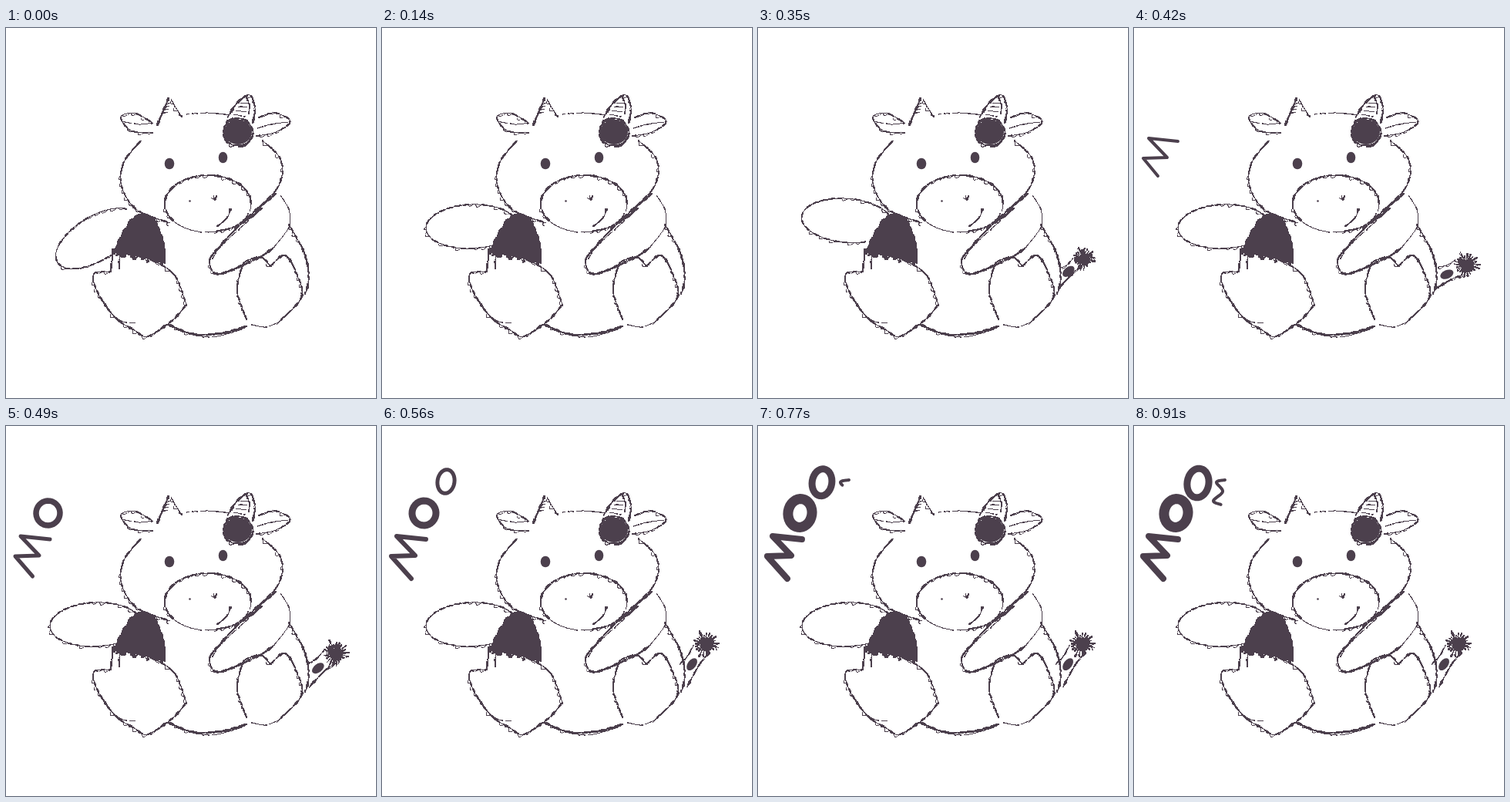
Animation, 480 px wide and 480 px high, one loop 980 ms. Source, as an HTML page with a canvas:

```html
<!DOCTYPE html>
<html lang="en">
<head>
<meta charset="utf-8">
<title>Moo</title>
<style>
html, body { margin: 0; width: 100%; height: 100%; overflow: hidden; background: #fff; }
canvas { display: block; width: 480px; height: 480px; }
</style>
</head>
<body>
<canvas id="stage" width="480" height="480"></canvas>
<script>
const INK = '#4c404d';
const STEP = 70;
const STEPS = 14;
const TAU = Math.PI * 2;
const ctx = document.getElementById('stage').getContext('2d');

const lerp = (a, b, t) => a + (b - a) * t;
const ramp = (from, to, v) => Math.max(0, Math.min(1, (v - from) / (to - from)));
const random = seed => Math.abs(Math.sin(seed * 127.1 + 3.7) * 43758.5) % 1;
const parse = text => text.split(' ').map(pair => pair.split(',').map(Number));

// Pencil grain: smooth noise fixed to the paper.
const grain = (x, y) => Math.sin(x * 0.37 + y * 0.23) * Math.sin(y * 0.41 - x * 0.19 + 1);

// Catmull-Rom curve through a few key points.
function spline(points) {
  const out = [];
  const at = i => points[Math.max(0, Math.min(points.length - 1, i))];
  for (let i = 0; i < points.length - 1; i++) {
    const [a, b, c, d] = [at(i - 1), at(i), at(i + 1), at(i + 2)];
    const n = Math.max(2, Math.ceil(Math.hypot(c[0] - b[0], c[1] - b[1]) * 1.5));
    for (let j = 0; j < n; j++) {
      const t = j / n;
      out.push([0, 1].map(k => b[k] + 0.5 * t * (c[k] - a[k]
        + t * (2 * a[k] - 5 * b[k] + 4 * c[k] - d[k]
        + t * (3 * (b[k] - c[k]) + d[k] - a[k])))));
    }
  }
  return out;
}

function arc(cx, cy, rx, ry, tilt, from, to) {
  const c = Math.cos(tilt), s = Math.sin(tilt);
  return Array.from({ length: 33 }, (_, i) => {
    const angle = lerp(from, to, i / 32);
    const u = rx * Math.cos(angle), v = ry * Math.sin(angle);
    return [cx + u * c - v * s, cy + u * s + v * c];
  });
}

// Grain varies the width; heavy lines get a loose second pass.
function pencil(weight, points) {
  for (const [x, y] of spline(points)) {
    const g = grain(x, y);
    const size = Math.max(1, Math.round(weight + g));
    if (weight > 1 || g < 0.6) {
      ctx.fillRect(Math.round(x - size / 2), Math.round(y - size / 2), size, size);
    }
    if (weight > 1 && g < -0.1) {
      ctx.fillRect(Math.round(x + g * 3), Math.round(y - g * 3), 1, 1);
    }
  }
}

const line = (weight, text) => pencil(weight, parse(text));

function oval(x, y, rx, ry, tilt = 0) {
  ctx.beginPath();
  ctx.ellipse(x, y, rx, ry, tilt, 0, TAU);
  ctx.fill();
}

function drawHead() {
  line(1, '234,112 262,110 290,113');
  line(1.6, '175,146 153,174 150,205 170,236 213,253');
  line(1.6, '333,146 357,172 353,206 320,240');
  line(1.4, '190,123 168,111 149,115 162,133 190,136');
  line(1, '150,121 172,125 190,123');
  line(1.4, '328,116 348,110 369,121 350,135 325,140');
  line(1, '326,130 343,125 366,122');
  pencil(2, arc(262, 228, 56, 37, 0, Math.PI * 0.8, TAU));
  pencil(1, arc(262, 228, 56, 37, 0, 0, Math.PI * 0.8));
  line(2, '332,234 301,256 272,264');
  line(1.6, '291,235 287,246 274,257');
  line(1.6, '269,217 271,223 273,218');
  oval(238.5, 224.5, 1.3, 1.3);
  oval(212, 176, 6.3, 7.3);
  oval(281.5, 168, 5.8, 7.3);
}

function drawHorns() {
  line(2.2, '196,126 203,110 211,91');
  line(1.3, '214,92 220,103 228,115');
  line(2, '288,115 300,97 316,87 323,104 320,123');
  line(1, '291,110 302,95 314,88');
  line(1.3, '312,90 316,101 315,111');
  for (let i = 0; i < 4; i++) {
    pencil(1, [[304 - i * 3, 97 + i * 5], [314 - i, 97 + i * 6]]);
    pencil(1, [[207 - i * 2, 99 + i * 4], [213 - i, 97 + i * 4]]);
  }
  oval(301, 135, 18, 16);
  for (let i = 0; i < 18; i++) {
    const angle = i * TAU / 18;
    pencil(2, arc(301, 135, 18 + random(i) * 2, 17 + random(i + 9) * 2, 0, angle, angle + 0.5));
  }
}

function drawBody() {
  line(2, '350,215 309,250 274,287 264,304 277,319 329,297 348,284');
  line(1, '348,284 367,258 367,236 356,217');
  line(1, '267,300 284,278 326,240');
  line(1.8, '367,255 387,292 393,325 388,345');
  line(2.2, '211,385 243,397 280,396 312,387');
  line(1, '219,391 264,401 306,391');
}

function drawFeet() {
  line(1.6, '308,304 300,340 312,378');
  line(1.8, '308,304 330,297 343,309');
  line(1.8, '343,309 362,295 378,321 383,350 353,382');
  line(1, '353,382 336,388 316,384');
  line(1.8, '136,316 114,319 119,343 142,376 168,393');
  line(1, '142,376 155,382 168,382');
  line(1.8, '168,393 184,400 216,379 234,359');
  line(1.6, '234,359 218,320 184,299 148,292');
  line(2, '139,287 136,316');
  line(1.6, '148,292 147,312');
}

// Hatching fans out from the shoulder to the ragged lower edge.
function drawPatch() {
  for (let i = 0; i <= 30; i++) {
    const u = i / 30;
    const top = [lerp(163, 192, u), 249 - 7 * Math.sin(u * Math.PI)];
    const end = [lerp(140, 206, u), lerp(288, 302, u) + random(i) * 6];
    const bow = [lerp(top[0], end[0], 0.5) + lerp(-2, 4, u), lerp(top[1], end[1], 0.5)];
    pencil(3, [top, bow, end]);
  }
}

function drawArm(step) {
  const lift = step < 6 ? 2 - Math.abs(step - 4) / 2 : 1;
  const tilt = -0.55 + 0.67 * lift - 0.165 * lift * lift;
  pencil(1.3, arc(117 - lift, 273 - 15.5 * lift, 59, 28.5, tilt, -0.45, 1.1 - TAU));
}

function drawTail(step) {
  if (step < 4) return;
  const pose = Math.min(step, 8);
  const grow = ramp(4, 6, pose);
  const angle = -0.4 - 0.27 * Math.abs(pose - 6);
  const reach = 40 + 3.2 * (pose - 4);
  const c = Math.cos(angle), s = Math.sin(angle);
  const place = (along, across) => [388 + along * c - across * s, 325 + along * s + across * c];
  const half = lerp(5, 11, grow);

  pencil(1.3, [place(12, -half), place(reach * 0.5, -half + 2), place(reach - 10, -half)]);
  pencil(1.8, [place(-4, half + 3), place(reach * 0.5, half - 1), place(reach - 8, half)]);
  if (grow) oval(...place(reach * 0.4, 2), 9, 5.5, angle);

  const [x, y] = place(reach, 0);
  const size = lerp(11, 15, grow);
  oval(x + 2, y + 2, size * 0.55, size * 0.55);
  for (let i = 0; i < 22; i++) {
    const turn = i * TAU / 22;
    const far = size * (0.75 + 0.5 * random(i + 5));
    pencil(1.8, [[x, y], [x + far * Math.cos(turn), y + far * Math.sin(turn)]]);
  }
}

function marker(width, points) {
  ctx.lineWidth = width;
  ctx.lineCap = ctx.lineJoin = 'round';
  ctx.beginPath();
  points.forEach(([x, y]) => ctx.lineTo(x, y));
  ctx.stroke();
}

// Each letter appears in turn, then swells.
function drawMoo(step) {
  if (step < 6) return;
  const write = ramp(6, 8, step);
  const swell = ramp(8, 10, step);
  const settle = ramp(8, 13, step);
  const ring = (x, y, rx, ry) => arc(x, y, rx, ry, 0.15, 0, TAU);

  const tail = [lerp(31, 38, write), lerp(192, 198, write)];
  marker(4 + 2 * write + 2 * swell, [...parse('57,147 19,143 43,168 12,169'), tail]);
  if (step >= 7) marker(lerp(6, 9, write) + 4 * swell, ring(54.5, 113, 15.5, lerp(16, 18.5, swell)));
  if (step >= 8) marker(5 + 4 * swell, ring(83, lerp(72, 74, settle), lerp(11, 14, settle), lerp(15.5, 19, settle)));
  if (step >= 11) {
    const hook = spline(parse('118,70 107,73 115,85 103,97 113,102'));
    marker(4, hook.slice(0, hook.length * ramp(10, 13, step)));
  }
}

function draw(step) {
  ctx.fillStyle = '#fff';
  ctx.fillRect(0, 0, 480, 480);
  ctx.fillStyle = ctx.strokeStyle = INK;
  drawHead();
  drawHorns();
  drawBody();
  drawFeet();
  drawPatch();
  drawArm(step);
  drawTail(step);
  drawMoo(step);
}

let shown = -1;
const start = performance.now();
function tick() {
  const step = Math.floor((performance.now() - start) / STEP) % STEPS;
  if (step !== shown) draw(shown = step);
  requestAnimationFrame(tick);
}
tick();
</script>
</body>
</html>
```
